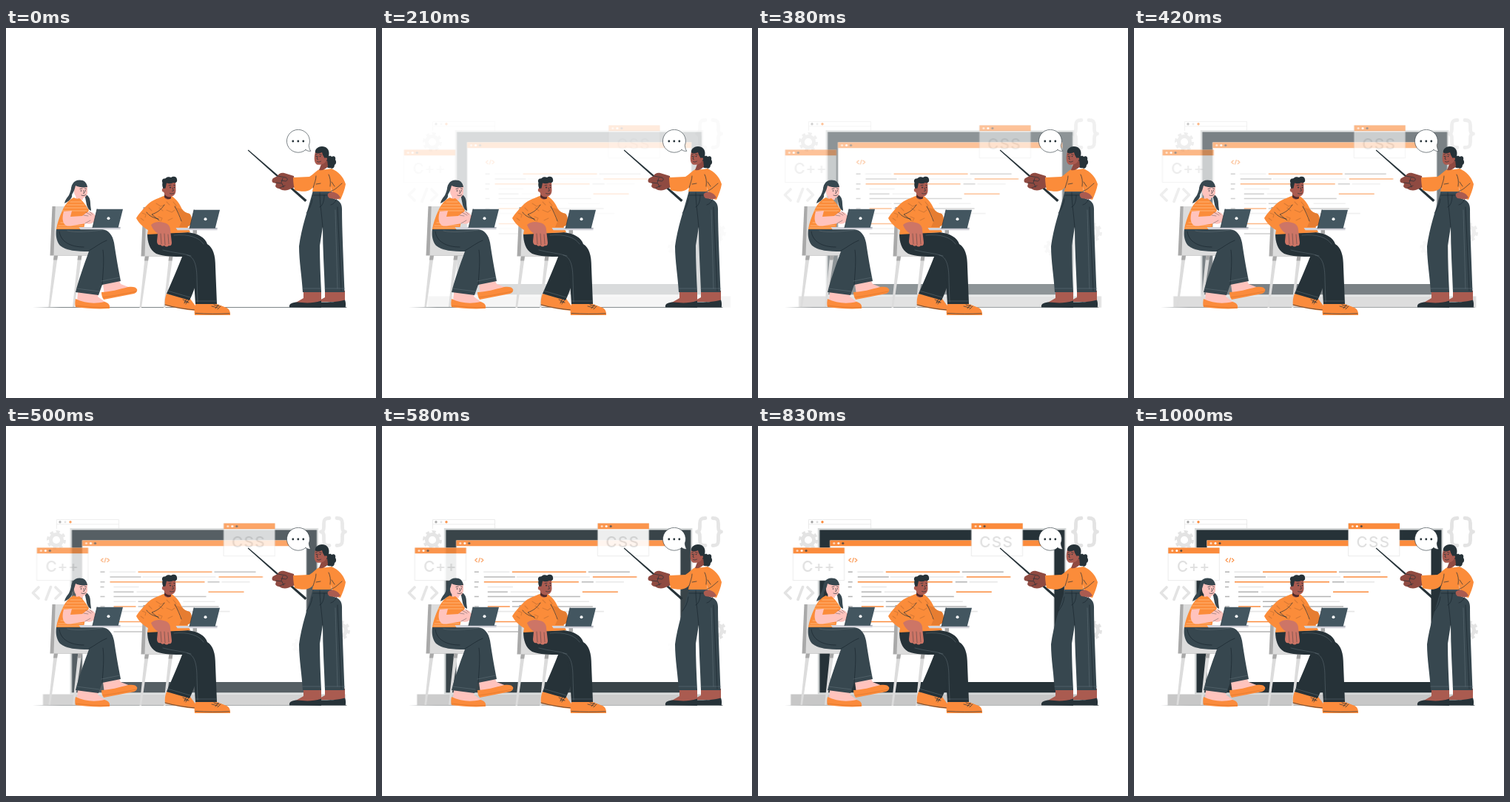
Animation, 500 px wide and 500 px high, one loop 1040 ms. Source, as an HTML page:

```html
<!DOCTYPE html>
<html lang="en">
<head>
<meta charset="utf-8">
<title>Coding class</title>
<style>
html, body { margin: 0; width: 100%; height: 100%; overflow: hidden; background: #fff; }
svg { display: block; width: 100vw; height: 100vh; }
path, line { stroke-linecap: round; stroke-linejoin: round; }

.enter { animation: enter 1040ms infinite; }
.from-right { --dx: 20px; }
.from-left { --dx: -20px; }
.still { --dx: 0px; }
@keyframes enter {
  0% { opacity: 0; transform: translateX(var(--dx)); animation-timing-function: cubic-bezier(.36, -.01, .5, 1.38); }
  93%, 100% { opacity: 1; transform: none; }
}

.orange { fill: #fb8b3c; }
.shirt { fill: #fb8c3a; }
.slate { fill: #37474f; }
.ink { fill: #263238; }
.white { fill: #fff; }
.pink { fill: #ffc3bd; }
.brown { fill: #aa5b50; }
.rose { fill: #cd7566; }
.umber { fill: #8f4a41; }
.pale { fill: #dcdcdc; }
.grey { fill: #a9a9a9; }
.thin { fill: none; stroke: #263238; stroke-width: .7; }
.seam { fill: none; stroke: #17232a; stroke-width: .6; }
.stitch { fill: none; stroke: #71818a; stroke-width: .4; }
.print { fill: none; stroke: #d87a35; stroke-width: 1.1; }
.code path { fill: none; stroke-width: 1.6; stroke-linecap: butt; }
.mark { fill: none; stroke: #e3e3e3; }
.gear { fill: none; stroke: #e3e3e3; }
.label { font: 500 20.6px Inter, "Open Sans", sans-serif; fill: #e0e0e0; }
</style>
</head>
<body>
<svg viewBox="0 0 500 500">
  <defs>
    <linearGradient id="floor" gradientUnits="userSpaceOnUse" x1="36" y1="0" x2="460" y2="0">
      <stop offset="0" stop-color="#263238" stop-opacity="0"/>
      <stop offset=".09" stop-color="#263238"/>
      <stop offset="1" stop-color="#263238"/>
    </linearGradient>
    <g id="gear" class="gear">
      <circle r="7.6" stroke-width="5"/>
      <circle r="11" pathLength="16" stroke-width="4" stroke-dasharray="1.05 .95"/>
    </g>
    <g id="pane">
      <path d="M0 0h68.8v44h-68.8z" fill="#fff" stroke="#dcdcdc" stroke-width=".6"/>
      <path class="orange" d="M-.2-.3h69.2v7.9H-.2z"/>
      <circle cx="5.3" cy="3.7" r="1.5" fill="#ffd9bd"/>
      <circle cx="11.3" cy="3.7" r="1.5" fill="#fff"/>
      <circle cx="17.3" cy="3.7" r="1.5" fill="#5a4a42"/>
    </g>
    <g id="chair">
      <path class="pale" d="M66 241h17l2 58h27v8H64z"/>
      <path class="grey" d="M62.5 241h4.2l-2.2 66.500h-5z"/>
      <path d="M82 299.500h30M65 307.500h47" fill="none" stroke="#bdbdbd" stroke-width=".7"/>
      <path class="pale" d="M64.800 307.500h5.200L60 377h-2.600zM97.300 307.500h5.200L92.500 377H90z"/>
      <path class="grey" d="M64.800 307.500h5.200l-.9 6h-5.100zM97.300 307.500h5.200l-.9 6h-5.100z"/>
    </g>
    <g id="laptop">
      <path d="M-23 23.800h56v3.200h-54z" fill="#d3d3da"/>
      <path d="M-4 23.800h37v1.300H-5z" fill="#a7abb5"/>
      <path d="M1.500-.5h35l-6.300 25H-4.500z" fill="#435660"/>
      <path d="M1.500-.5l-6 25" fill="none" stroke="#263238" stroke-width=".7"/>
      <circle cx="17" cy="12" r="2" fill="#fff"/>
    </g>
  </defs>

  <line x1="36" y1="377.500" x2="460" y2="377.510" stroke="url(#floor)" stroke-width=".6"/>

  <g class="enter still">
    <use href="#gear" x="68" y="154"/>
    <use href="#gear" x="452" y="276"/>
    <use href="#gear" transform="translate(397 297) scale(.82)"/>
    <path class="mark" stroke-width="3.600" d="M44 218l-7.500 7.500 7.500 7.500M60.500 217.500l-6.500 17M67 218l7.500 7.500-7.500 7.500"/>
    <path class="mark" stroke-width="4.800" d="M437 124.500c-6 0-7.500 2-7.500 7v5c0 4-1 6.500-4 6.500 3 0 4 2.500 4 6.500v5c0 5 1.500 7 7.500 7M447 124.500c6 0 7.500 2 7.500 7v5c0 4 1 6.500 4 6.500-3 0-4 2.500-4 6.500v5c0 5-1.500 7-7.500 7"/>
    <path d="M68.500 138.500v-12h84v12M68.500 132.800h84" fill="none" stroke="#e2e2e2" stroke-width=".7"/>
    <circle cx="73" cy="129.700" r="1.700" fill="#a6a6a6"/>
    <circle cx="80" cy="129.700" r="1.500" fill="#ddd"/>
    <circle cx="87" cy="129.700" r="1.700" class="orange"/>
  </g>

  <g class="enter from-right">
    <path fill="#c7c7c7" d="M45.500 362.500h409v15.300h-409z"/>
    <path fill="#d5d8d8" d="M82 138h335.500v224.800H82z"/>
    <path class="ink" d="M84.500 140.500h331v219.700h-331z"/>
    <path class="white" d="M98.500 154.500H401.500v191.500h-303z"/>
    <path class="orange" d="M98.500 154.500H401.500v7.800h-303z"/>
    <circle cx="104" cy="158.400" r="1.500" fill="#ffd9bd"/>
    <circle cx="110" cy="158.400" r="1.500" fill="#fff"/>
    <circle cx="116" cy="158.400" r="1.500" fill="#5a4a42"/>
    <path d="M126.500 179l-2.500 2.300 2.500 2.300M130.500 178.500l-1.800 5.600M132.500 179l2.500 2.300-2.500 2.300" fill="none" stroke="#fb8b3c" stroke-width="1.100"/>
    <g class="code">
      <path stroke="#e6e6e6" d="M135.500 197.300h35M180 204h99M287 210.800h38M141 217.500h34M172 224.200h43M141 237.200h30M235 237.200h43M141 250.600h157M141 271h50"/>
      <path stroke="#b3b3b3" d="M123 197.300h6M277 197.300h56M136 204h42M123 210.800h6M268 210.800h16M123 217.500h5M141 224.200h27M123 230.500h6M141 230.500h125M174 237.200h26M123 244h6M174 244h109M141 278h50"/>
      <path stroke="#fb8b3c" d="M174 197.300h100M283 204h59.500M136 210.800h128M269 224.200h48M141 244h30M141 264.500h44"/>
    </g>
  </g>

  <g class="enter from-left">
    <use href="#pane" x="46.500" y="164.700"/>
    <text class="label" x="58" y="197" letter-spacing=".8">C++</text>
  </g>
  <g class="enter from-right">
    <use href="#pane" x="290" y="131.700"/>
    <text class="label" x="300.500" y="164" letter-spacing="1.400">CSS</text>
  </g>

  <path d="M405 164.600a15.500 15.500 0 1 1 4.300-6c.3 3 1 5.900 2.500 7.700-3 .3-5-.3-6.800-1.700z" fill="#fff" stroke="#263238" stroke-width=".6"/>
  <g class="ink"><circle cx="387.800" cy="153" r="1.400"/><circle cx="394.800" cy="153" r="1.400"/><circle cx="401.800" cy="153" r="1.400"/></g>

  <!-- student on the left -->
  <use href="#chair"/>
  <path class="slate" d="M106 224c6 2 8 7 8 13 0 4 1 7 1 10-3-1-5-4-6-8zM90 212c-2 5-3 10-5 14-3 4-5 6-6 11 4-2 8-4 10-9z"/>
  <path class="pink" d="M95 220h9v12l-10 2z"/>
  <path class="shirt" d="M92 229c-7 3-12 9-16 18-4 9-7 17-8 25h37l3-17 4-9c-4-7-9-13-13-16-2 1-5 1-7-1z"/>
  <path d="M87 235h15M82 239h24M79 243h31M76 247h33M74 263h30M71 267h33M70 270h34" fill="none" stroke="#ffbd83" stroke-width=".8"/>
  <path class="pink" d="M78 248c-2 7-2 13 1 17 2 3 6 3 11 2l18-3c5 2 9 0 12-3l1-7c-3-6-9-7-13-4l-5 4-16 1 2-8z"/>
  <path d="M105 253l6 1M108 249l7 4M113 248l4 4M107 264l7-4" class="thin" opacity=".55"/>
  <path class="pink" d="M92 214c-1 9 1 15 7 16 6 1 10-2 11-7v-10l-8-5z"/>
  <path class="slate" d="M88 222c-1-9 3-16.500 11.500-16.500 6 0 9.500 3 10.500 9.500-6 1-12 0-16-2-1 4-2 8-5 12z"/>
  <g class="ink"><circle cx="101.500" cy="220" r=".8"/><circle cx="107.500" cy="220" r=".7"/></g>
  <path class="thin" d="M100 217.500l3-.5M106.500 217l2 .5M105 219.500l1 3.500-1.500.3M102 226c2 1 4 .6 5.500-.5"/>
  <path class="pink" d="M131 346l22-4 2 4 13 5-8 6-27 4zM97 356l28 4-1 3 11 8-12 5-27-6z"/>
  <path class="slate" d="M68.500 272H130c9 1 14 8 16 18 3 20 6 37 9 52l-25 5-5 14-31-4c4-16 11-36 18-55-16 0-31-1-39-8-5-6-6-14-5-22z"/>
  <path class="seam" d="M112 301c9-5 16-11 24-14M130 347c1-16 3-33 1-47M72 275c2 14 15 21 33 21"/>
  <path class="stitch" d="M95 352l31 4M129 342l25-5M83 274c12 3 30 1 47-1"/>
  <path class="orange" d="M129 357c10 0 25-4 36-7 6-1 11 0 12 3 1 2-1 5-4 6l-41 8c-2-3-3-6-3-10zM94 366c12 6 26 7 39 4 5 1 8 4 7 9-16 1-32 0-46-2-1-3-1-7 0-11z"/>
  <path d="M131 364c15-2 30-5 45-8M94 375c16 2 31 3 45 2.500" fill="none" stroke="#d87527" stroke-width=".6"/>
  <use href="#laptop" x="121.500" y="245.200"/>

  <!-- student in the middle -->
  <use href="#chair" x="123" y="1"/>
  <path class="grey" d="M252.500 272h5.500v6.500h-5.500z"/>
  <path class="orange" d="M217 359l32 7 8 11-1 5c-14-1-28-4-41-7-1-6 0-11 2-16z"/>
  <path class="thin" d="M215 374c14 4 28 6 41 7M239 367l7 3M241 370l6 1M244 366l-3 6M247 367l-4 6"/>
  <path class="ink" d="M240 304c-7 18-15 37-23 55l31 9c6-12 13-31 14-52l-8-15z"/>
  <path class="ink" d="M191 278l55-2c14 2 23 7 26 16 8 5 11 15 11 31l2 50h-29l-2-31c-1-20-4-31-14-33-13 0-27 0-37-4-9-5-12-16-12-27z"/>
  <path class="stitch" d="M218 355l31 9M256 369h28M245 307c10 2 13 15 13 33l1 30M212 300c14 4 27 4 38 8M227 280c20-2 34 3 40 12"/>
  <path class="orange" d="M256 373h29l13 5c4 2 5 5 5 10h-48c-1-5 0-10 1-15z"/>
  <path class="thin" d="M256 385.500c16 1 31 1 46 .3M278 376l8 2M281 374l7 2M283 379l4-5M286 380l4-4"/>
  <path class="shirt" d="M213 227c-10 4-18 7-23 13-7 7-12 13-14 17 3 6 9 12 16 16l-1 6 58-3-4-8 6-3c0-6 0-11-3-14-5-1-8-3-10-6-3-7-7-13-14-18-4 1-8 0-11 0z"/>
  <path d="M228 242c5 6 9 13 9 20l-3 7h11l6-4c0-6 0-11-3-14-5-1-8-3-10-6z" fill="#e67d31"/>
  <path class="print" d="M203 237l6 4 5-2M207 243l5 4M226 235l4 5-2 3M217 246l7 3 4-3M206 255l5 2-2 4M219 260l6-3M184 250l5 2-1 4M193 243l4 4M182 257l4 3M217 235l4 4"/>
  <path class="thin" d="M214 239c-5 7-9 10-17 13l10 8M190 249c3 5 10 8 16 9M228 241c4 7 7 14 9 20"/>
  <path class="rose" d="M196 266c4-4 11-5 17-3 6 1 9 5 9 10l2 17c0 4-2 5-4 4-2 2-4 2-6 0-2 1-4 1-5-1-3 1-5-1-5-5l1-10c-3-3-7-6-9-12z"/>
  <path class="thin" d="M209 278l1 14M214 278l1 15M219 279l1 13" opacity=".6"/>
  <path class="brown" d="M214 217h10l-1 13c-3 3-7 2-9-1z"/>
  <path d="M214 225c3 3 6 4 9 3l-.3 2.500c-3 1.500-6.700 0-8.700-2z" fill="#4f2b2a"/>
  <path class="brown" d="M213.500 208c-2.500 9-1 17 4.500 19.500 7 1.500 11-1.500 11.500-7.500l-.5-13-8-3z"/>
  <circle class="brown" cx="213.500" cy="219" r="2.700"/>
  <path class="ink" d="M212.500 217c-1.500-3-1.500-6-1-8-1.500-3 0-6 3.500-5.500 3-3 6-2.500 8-1.500 3-2.500 8-1.500 8 2.500 1 4-2 5.500-5 4.500-3 1.500-6 1.500-9 .5l-1.500 7z"/>
  <g class="ink"><circle cx="222" cy="215.500" r=".9"/><circle cx="227.500" cy="215.500" r=".8"/></g>
  <path class="thin" d="M220 212.800l3-.6M226.500 212.300l2 .5M225 216l1.500 4-2 .3M221.500 223.500c2 1 4 .6 5.500-.3"/>
  <use href="#laptop" x="252.500" y="246.200"/>

  <!-- teacher -->
  <path class="ink" d="M326.700 165.400l.8-.8 79 68-2.300 2.300z"/>
  <path class="umber" d="M389 200l-13-4c-4-1-8 1-9 4l-6 3c-2 2-2 5 0 6l4 1-1 4c1 2 3 3 5 3l4 2c5 1 9 0 12-2l6-2z"/>
  <path class="thin" d="M367 200l11 2c3 1 3 4 0 5l-6-1M365 209l8 1 2 5M370 216l7-3M374 203l-2 6"/>
  <path class="brown" d="M402 355h24v17h-36l12-7zM431 355h27v15h-38l11-6z"/>
  <path class="ink" d="M383 377.500c-1-5 4-7 11-7 9 1 20 2 32-2v9.500zM413 377.500c1-6 6-7 13-7 11 0 21 0 32-3 1.500 4 1 7 .8 10z"/>
  <path class="slate" d="M415 219.500h25l2 11c9 2 12 7 12 14 0 28 2 67 3.500 112.500h-26.500c-1-29-3-59-3-88l-4 25c0 20 1 43 2 63h-25c-1-20-5-42-5-62 3-25 12-49 19-75.500z"/>
  <path class="seam" d="M424 222c0 13 2 24 4 47M415 226h25M430 226c0 8-2 14-6 16M439 239c4-1 7-5 8-9M448 242l5 113M414 231c-1 8-4 14-8 19"/>
  <path class="stitch" d="M401 352h24M431 352h27M416 222h24M445 246l3 106"/>
  <path class="shirt" d="M425 190c-6 3-10 8-15 11l-22 1c0 6 1 12 2 17 9 2 19 4 25-4l-1 6h26l-1-7 4 16 9 2c3-7 6-14 7-21-3-10-10-17-19-21-5 1-10 2-15 0z"/>
  <path class="thin" d="M415 216c2-7 4-11 4-16M425 210l-6 1M438 214c1-7 0-12-2-16M440 208l4 6M440 220c5-1 10-7 14-10"/>
  <path class="brown" d="M435 224c4-4 9-3 14 1l3 4c-2 2-5 3-8 2l-7-1c-2-2-3-4-2-6z"/>
  <path class="ink" d="M434 176c1-4 5-4 6-2 4-2 6 1 5 4 2 3 1 6-1 7 0 4-3 6-6 4-3 1-6-2-5-6-2-2-1-6 1-7z"/>
  <path class="umber" d="M425 178h9l1 9c-3 4-8 6-12 5l3-8z"/>
  <path class="brown" d="M418 167c-2 8-2 15 2 17.500 6 1 11-1 13-5.500l1-10-7-5z"/>
  <path class="ink" d="M418 168.500c-1-4 3-8.500 9-8.500 6 0 9.500 4 9.500 9 0 4-1 8-2.500 11-3-4-6-7-7-12-3 1.500-6 2-9 .5z"/>
  <circle class="brown" cx="432.300" cy="177" r="1.800"/>
  <g class="ink"><circle cx="419.500" cy="173.500" r=".8"/><circle cx="424.500" cy="173.500" r=".8"/></g>
  <path class="thin" d="M418.500 171l1.800-.4M423.500 170.700l2.700.7M421.500 173l-1.500 4 1.500.4M420.500 180.500c2 1 3 .7 5-.4"/>
</svg>
</body>
</html>
```
